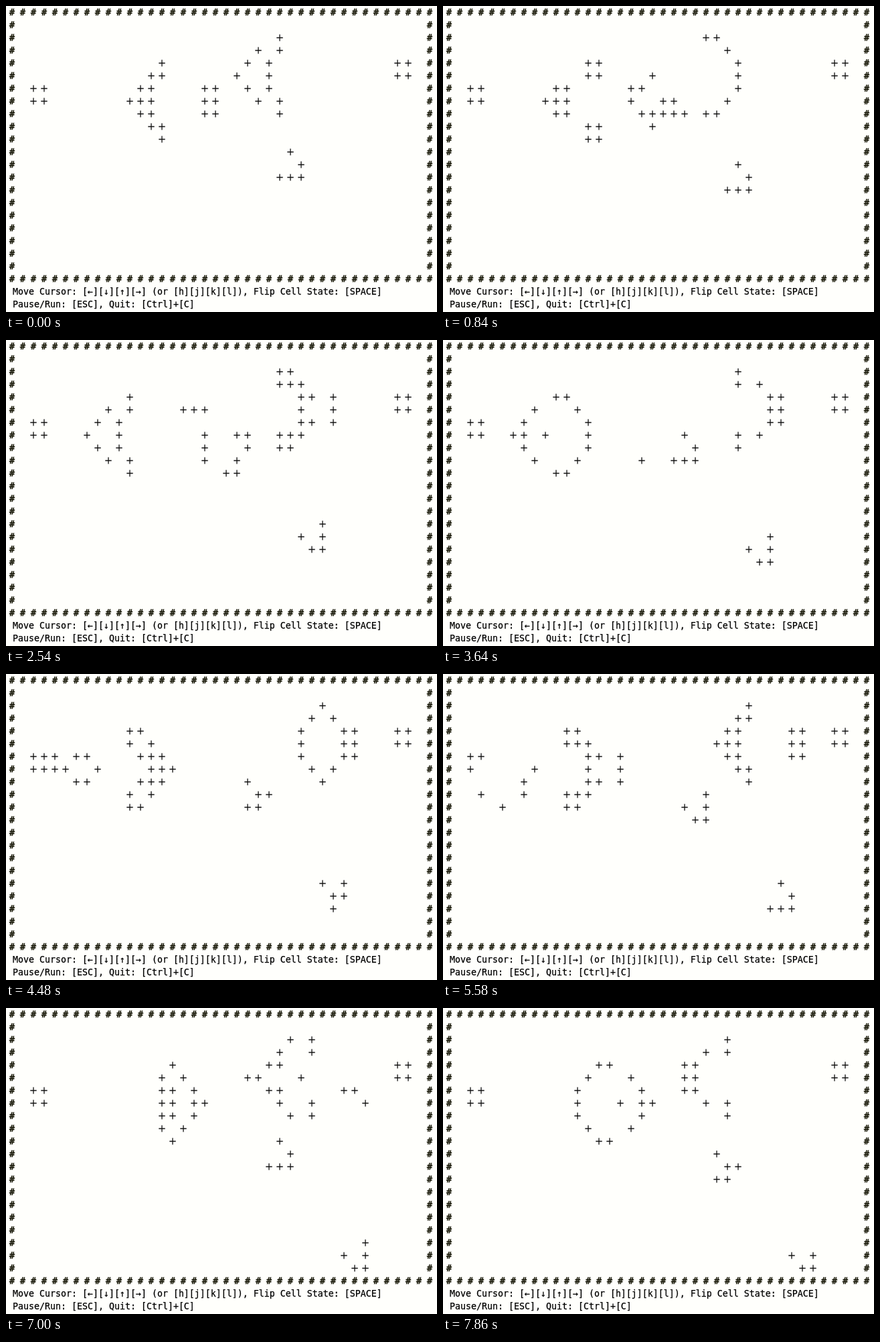
Recreate the animation shown at these times as an HTML page. Size 644 by 458 pixels, loop 8000 ms.

```html
<!DOCTYPE html>
<html lang="en">
<head>
<meta charset="utf-8">
<title>Life</title>
<style>
  html, body { margin: 0; width: 100%; height: 100%; overflow: hidden; background: #fffffc; }
  svg { display: block; width: 644px; height: 458px; }
  text { font: 13.29px "DejaVu Sans Mono", "Noto Sans Mono", monospace; fill: #000; stroke: #000; stroke-width: 0.25; white-space: pre; }
  .wall text { text-anchor: middle; fill: #121200; stroke: #121200; stroke-width: 0.5; }
  #cells { fill: none; stroke: #111; stroke-width: 1.3; }
</style>
</head>
<body>
<svg viewBox="0 0 644 458">
  <rect width="644" height="458" fill="#fffffc"/>
  <g class="wall" id="wall"></g>
  <path id="cells"/>
  <text x="10" y="432">Move Cursor: [←][↓][↑][→] (or [h][j][k][l]), Flip Cell State: [SPACE]</text>
  <text x="10" y="451">Pause/Run: [ESC], Quit: [Ctrl]+[C]</text>
</svg>
<script>
const COLS = 40, ROWS = 22, LOOP = 8000;
const PERIOD = 279.2, LEAD = 278.6; // ms per generation, age of the first one at t = 0
const WARMUP = 31;                  // generations run before the loop starts

// Glider gun, run-length encoded: b = dead, o = live, $ = next row
const GUN = "24bo$22bobo$12b2o6b2o12b2o$11bo3bo4b2o12b2o$2o8bo5bo3b2o$" +
  "2o8bo3bob2o4bobo$10bo5bo7bo$11bo3bo$12b2o";

const cx = c => 9 + 16 * c;
const cy = r => 9 + 19 * r;

function decode(rle, top, left) {
  const grid = Array.from({ length: ROWS }, () => Array(COLS).fill(0));
  rle.split("$").forEach((line, i) => {
    let c = left;
    for (const [, count, kind] of line.matchAll(/(\d*)([bo])/g)) {
      const end = c + Number(count || 1);
      if (kind === "o") grid[top + i].fill(1, c, end);
      c = end;
    }
  });
  return grid;
}

function step(grid) {
  const next = grid.map(row => row.slice().fill(0));
  for (let r = 1; r < ROWS - 1; r++) {
    for (let c = 1; c < COLS - 1; c++) {
      let n = -grid[r][c];
      for (let y = r - 1; y <= r + 1; y++)
        for (let x = c - 1; x <= c + 1; x++) n += grid[y][x];
      next[r][c] = n === 3 || (n === 2 && grid[r][c]) ? 1 : 0;
    }
  }
  return next;
}

function toPath(grid) {
  let d = "";
  grid.forEach((row, r) => row.forEach((on, c) => {
    if (on) d += `M${cx(c) - 4.7} ${cy(r) + 0.5}h9.4M${cx(c)} ${cy(r) - 4.4}v9.8`;
  }));
  return d;
}

function drawWall() {
  let out = "";
  for (let r = 0; r < ROWS; r++)
    for (let c = 0; c < COLS; c++)
      if (r % (ROWS - 1) === 0 || c % (COLS - 1) === 0)
        out += `<text x="${cx(c)}" y="${cy(r) + 5}">#</text>`;
  document.getElementById("wall").innerHTML = out;
}

const genAt = t => Math.floor((t + LEAD) / PERIOD);

let grid = decode(GUN, 2, 2);
for (let i = 0; i < WARMUP; i++) grid = step(grid);
const paths = [];
while (paths.length <= genAt(LOOP)) {
  paths.push(toPath(grid));
  grid = step(grid);
}

const cells = document.getElementById("cells");
let shown = -1;

function render(t) {
  const gen = genAt(t);
  if (gen !== shown) cells.setAttribute("d", paths[shown = gen]);
}

drawWall();
render(0);
let origin = null;
function tick(now) {
  if (origin === null) origin = now;
  render((now - origin) % LOOP);
  requestAnimationFrame(tick);
}
requestAnimationFrame(tick);
</script>
</body>
</html>
```
